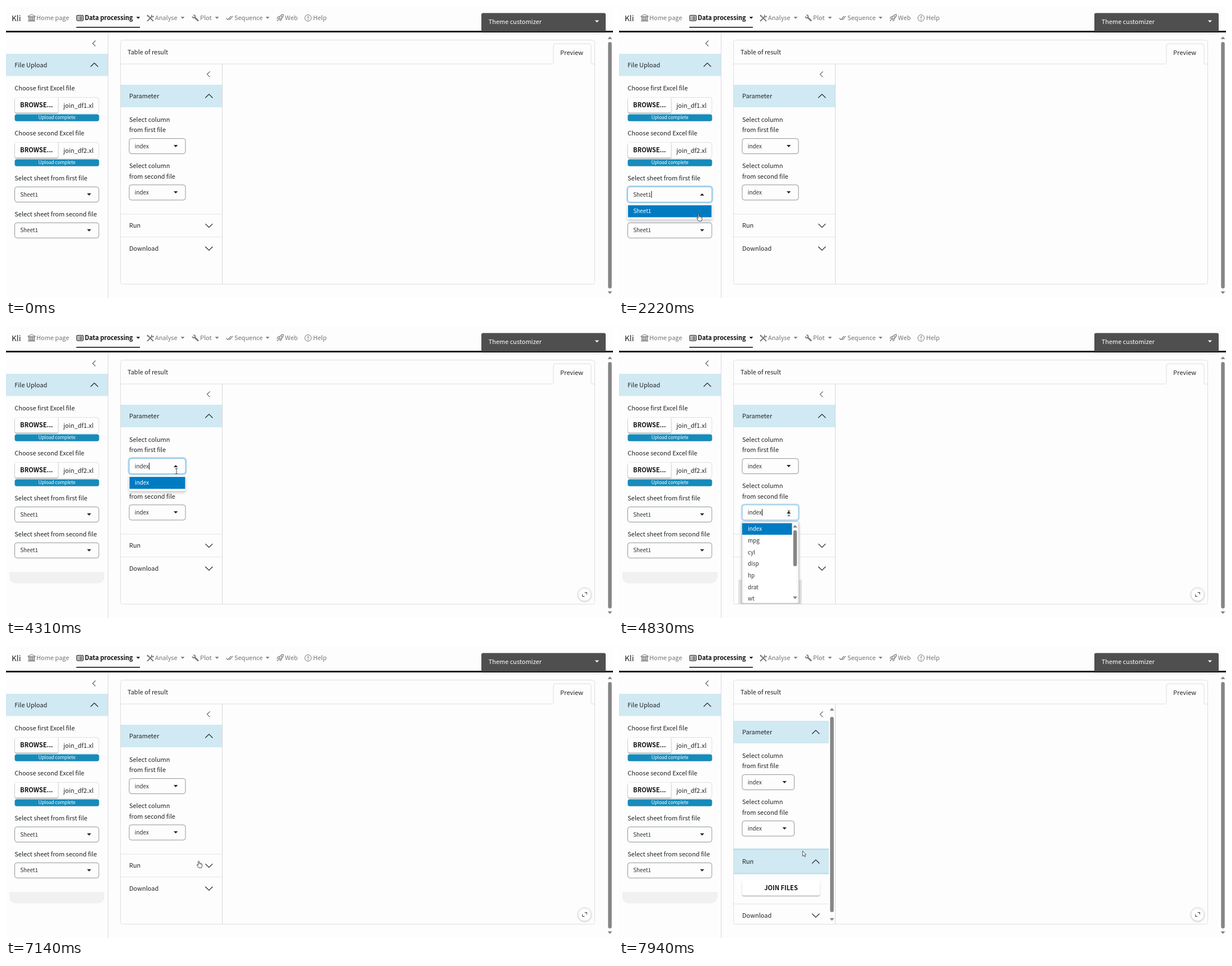
Write an HTML page with a canvas that moves like this. It is 1079 px wide and 519 px high and loops after 7990 ms.

```html
<!DOCTYPE html>
<html lang="en">
<head>
<meta charset="utf-8">
<title>File join</title>
<style>
html, body { margin: 0; width: 100%; height: 100%; overflow: hidden; background: #fdfdfd; }
canvas { display: block; width: 1079px; height: 519px; }
</style>
</head>
<body>
<canvas id="stage"></canvas>
<script>
const W = 1079, H = 519, LOOP = 7990;
const FONT = '"Noto Sans CJK SC", "Noto Sans CJK JP", "Noto Sans CJK", "Open Sans", sans-serif';
const INK = '#212325', GREY = '#757575', PAPER = '#fdfdfd', SKY = '#d0e9f2',
      LINE = '#dedede', BLUE = '#007bc2', TEAL = '#168bba';

const canvas = document.getElementById('stage');
const g = canvas.getContext('2d');
const dpr = window.devicePixelRatio || 1;
canvas.width = W * dpr;
canvas.height = H * dpr;

const clamp = (v, a = 0, b = 1) => Math.min(b, Math.max(a, v));
const smooth = v => { v = clamp(v); return v * v * (3 - 2 * v); };
const within = (t, a, b) => t >= a && t < b;

function text(s, x, y, o = {}) {
  const size = o.size || 10.97;
  g.font = `${o.weight || 400} ${size}px ${FONT}`;
  g.textAlign = o.align || 'left';
  g.fillStyle = o.color || INK;
  g.fillText(s, x, y + size * 0.37);
}

function rect(x, y, w, h, color) {
  g.fillStyle = color;
  g.fillRect(x, y, w, h);
}

function round(x, y, w, h, r, fill, stroke, lw = 1) {
  g.beginPath();
  g.roundRect(x, y, w, h, r);
  if (fill) { g.fillStyle = fill; g.fill(); }
  if (stroke) { g.strokeStyle = stroke; g.lineWidth = lw; g.stroke(); }
}

// Polyline given as a flat list of coordinates.
function poly(pts, color, lw = 1.2, fill) {
  g.beginPath();
  for (let i = 0; i < pts.length; i += 2) g.lineTo(pts[i], pts[i + 1]);
  if (fill) { g.closePath(); g.fillStyle = fill; g.fill(); }
  if (color) { g.strokeStyle = color; g.lineWidth = lw; g.stroke(); }
}

function ring(x, y, r, color, lw = 1, fill) {
  g.beginPath();
  g.arc(x, y, r, 0, Math.PI * 2);
  if (fill) { g.fillStyle = fill; g.fill(); }
  g.strokeStyle = color;
  g.lineWidth = lw;
  g.stroke();
}

// Small solid triangle; dir 1 points down, -1 up.
function wedge(x, y, dir = 1, color = INK, w = 3.7, h = 2) {
  poly([x - w, y - h * dir, x + w, y - h * dir, x, y + h * dir], null, 0, color);
}

// Wide chevron; dir 1 points down, -1 up.
const chevron = (x, y, dir) =>
  poly([x - 6.5, y - 3.2 * dir, x, y + 3.2 * dir, x + 6.5, y - 3.2 * dir], INK, 1.2);

const backArrow = (x, y) => poly([x + 2.5, y - 5, x - 2.5, y, x + 2.5, y + 5], '#666', 1.2);

function shaded(blur, dy, alpha, draw) {
  g.save();
  g.shadowColor = `rgba(0,0,0,${alpha})`;
  g.shadowBlur = blur * dpr;
  g.shadowOffsetY = dy * dpr;
  draw();
  g.restore();
}

/* ---------- navigation ---------- */

function icons() {
  // bank
  poly([39, 19, 39, 18, 45.5, 15, 52, 18, 52, 19], GREY, 1, PAPER);
  poly([39, 19.2, 52, 19.2], GREY, 1);
  for (let x = 41; x < 52; x += 3) rect(x - 0.7, 20, 1.6, 5, GREY);
  rect(40, 24.7, 11, 1, GREY);
  rect(39, 26.2, 13, 1.2, GREY);
  // list card
  round(125.7, 16.7, 11.6, 9.4, 1.5, null, INK, 1.2);
  for (let y = 19.2; y < 25; y += 2.2) {
    rect(127.5, y - 0.5, 1.6, 1.2, INK);
    rect(130.2, y - 0.5, 5.5, 1.2, INK);
  }
  // crossed tools
  poly([252, 17, 262, 27], GREY, 1.8);
  poly([251, 27, 260, 18], GREY, 1.8);
  poly([251, 18.2, 252.5, 16], GREY, 2);
  g.beginPath(); g.arc(260.5, 17.5, 2, 0, 4.3); g.lineWidth = 1.3; g.stroke();
  // wrench
  poly([335, 20, 342, 26.5], GREY, 2.6);
  g.beginPath(); g.arc(333.8, 18.6, 2.4, -1.8, 3.2); g.lineWidth = 1.8; g.stroke();
  // double tick
  poly([391.5, 21.5, 394.3, 24.3, 400, 17.8], GREY, 1.2);
  poly([396.5, 23.2, 397.6, 24.3, 403, 17.8], GREY, 1.2);
  // rocket
  poly([485, 22, 487, 18, 490, 15.6, 493.3, 15.2, 492.8, 18.5, 490.5, 21.3, 486.8, 23.5], GREY, 1.1, PAPER);
  poly([486.5, 18.5, 483.5, 18.8, 481.7, 21.7, 485, 21.8], GREY, 1);
  poly([490, 22, 489.5, 25, 487, 26.7, 486.8, 23.5], GREY, 1);
  poly([484.6, 23.4, 481.8, 26.8], GREY, 1.3);
  ring(489.9, 18.8, 1, GREY, 0.9);
  // notice
  ring(537, 21.3, 5.7, GREY, 1);
  rect(536.4, 18, 1.3, 4, GREY);
  rect(536.4, 23.1, 1.3, 1.4, GREY);
}

function navbar() {
  rect(0, 44, W, 3, '#19191b');
  text('Kli', 10, 22, { size: 13.7 });
  icons();
  const items = [['Home page', 54], ['Analyse', 265, 314], ['Plot', 345, 375],
                 ['Sequence', 406, 465], ['Web', 496], ['Help', 546]];
  for (const [label, x, mark] of items) {
    text(label, x, 21.3, { color: GREY });
    if (mark) wedge(mark, 21, 1, GREY, 3.4, 1.8);
  }
  text('Data processing', 140, 21.3, { weight: 700, color: '#111' });
  wedge(235, 21, 1, '#111', 3.4, 1.8);
  rect(125, 37, 113, 1.6, '#111');

  round(846, 44, 220, 6.5, [0, 0, 4, 4], 'rgba(0,0,0,.06)');
  round(845, 12.5, 221, 32.5, [3, 3, 0, 0], '#4f4f4f');
  text('Theme customizer', 857.7, 28.3, { color: '#fff' });
  wedge(1050.5, 27.3, 1, '#fff', 3.6, 1.9);
}

function scrollbar(x, top, from, to, bottom, w = 6.5) {
  wedge(x, top, -1, '#808080', 4, 2.2);
  round(x - w / 2, from, w, to - from, w / 2, '#868686');
  wedge(x, bottom, 1, '#808080', 4, 2.2);
}

/* ---------- controls ---------- */

function select(x, y, w, value, focus, blinkOn) {
  const h = 27, on = focus > 0;
  if (on) round(x - 1, y - 1, w + 2, h + 2, 5, null, `rgba(0,123,194,${0.28 * focus})`, 3);
  round(x, y, w, h, 4, PAPER, on ? '#82bce0' : '#8f959b');
  text(value, x + 9.7, y + 13.4, { size: 9.85, color: '#2e3236' });
  wedge(x + w - 17.3, y + 13.4, on ? -1 : 1);
  if (on && blinkOn) rect(x + 10 + g.measureText(value).width, y + 7.5, 1, 12, '#111');
}

function menu(x, y, w, value) {
  shaded(5, 3, 0.2, () => round(x - 0.5, y, w + 1, 28.5, 3, '#fff'));
  rect(x + 0.5, y + 3.4, w - 1, 21.3, BLUE);
  text(value, x + 10, y + 13.8, { size: 9.85, color: '#fff' });
}

function longMenu() {
  g.save();
  g.beginPath(); g.rect(204, 340, 180, 154); g.clip();
  rect(212, 451, 113, 43, '#e4e4e4');
  shaded(4, 2, 0.25, () => round(218.5, 347.5, 101, 145.5, 3, '#fff', '#ccc'));
  rect(219, 350.5, 88.5, 20.5, BLUE);
  ['index', 'mpg', 'cyl', 'disp', 'hp', 'drat', 'wt'].forEach((s, i) =>
    text(s, 229, 360.7 + i * 20.65, { size: 9.85, color: i ? '#2e3236' : '#fff' }));
  scrollbar(313, 356, 363, 427, 483);
  g.restore();
}

function button(x, y, w, h, label) {
  shaded(2, 1.5, 0.3, () => round(x, y, w, h, 3, '#fff'));
  text(label, x + w / 2, y + h / 2 - 0.2, { size: 11.1, weight: 700, align: 'center', color: '#111' });
}

function upload(y, label, file) {
  text(label, 15.3, y);
  round(15.5, y + 16.5, 149.5, 28.5, 4, PAPER, '#e0e0e0');
  button(16, y + 16.5, 76.5, 27, 'BROWSE...');
  rect(92.5, y + 16.5, 1, 28, '#dcdcdc');
  text(file, 102, y + 31);
  round(15.5, y + 46.4, 150, 12.4, 3.5, TEAL);
  text('Upload complete', 90.5, y + 52.3, { size: 8.25, color: '#fff', align: 'center' });
}

/* ---------- panels ---------- */

// Focus spans of the four drop-downs.
const OPEN = { sheet1: [1200, 2300], sheet2: [2640, 3430], col1: [3790, 4530], col2: [4780, 6160] };

const focusOf = (t, k) => within(t, ...OPEN[k]) ? clamp((t - OPEN[k][0] + 40) / 130) : 0;
const blink = (t, k) => (t - OPEN[k][0]) % 1010 < (k === 'col1' ? 600 : 505);
const menuOn = (t, k) => within(t, OPEN[k][0] + 40, OPEN[k][1]);

function leftPanel(t) {
  rect(181, 47, 1, H - 47, '#dadada');
  backArrow(156.5, 66.5);
  rect(0, 85, 181, 39.5, SKY);
  text('File Upload', 15.3, 104.7);
  chevron(157, 104.5, -1);
  upload(146, 'Choose first Excel file', 'join_df1.xl');
  upload(226, 'Choose second Excel file', 'join_df2.xl');
  text('Select sheet from first file', 15.3, 306.3);
  text('Select sheet from second file', 15.3, 370);
  if (t >= 2680) round(6, 437, 169, 20.5, [2, 2, 12, 12], '#f1f1f1');
  if (menuOn(t, 'sheet2')) round(10, 437, 161, 17, [2, 2, 10, 10], '#dedede');
  select(15.5, 321.5, 149.5, 'Sheet1', focusOf(t, 'sheet1'), blink(t, 'sheet1'));
  select(15.5, 385.3, 149.5, 'Sheet1', focusOf(t, 'sheet2'), blink(t, 'sheet2'));
  if (menuOn(t, 'sheet1')) menu(15.5, 350.8, 149.5, 'Sheet1');
  if (menuOn(t, 'sheet2')) menu(15.5, 414.6, 149.5, 'Sheet1');
}

function card() {
  round(203.5, 60.5, 843, 434, 4, PAPER, LINE);
  rect(204, 102.5, 842, 1, LINE);
  text('Table of result', 216, 81.8);
  round(973, 67, 67, 37, [4, 4, 0, 0], PAPER, LINE);
  rect(972.5, 102, 68, 3, PAPER);
  text('Preview', 985.3, 83);
  rect(384, 103, 1, 391, '#d6d6d6');
}

function innerPanel(t) {
  const run = t >= 7290;
  const e = run ? smooth((t - 7290) / 350) : 0;
  const grow = 55 * e;
  const bar = grow > 42;
  const up = clamp((grow - 42) * 0.7, 0, 7);
  const right = bar ? 373 : 384, chev = right - 23.2, w = bar ? 92.5 : 100;

  g.save();
  g.beginPath(); g.rect(204, 103, 180, 391); g.clip();
  backArrow(360, 121.3);
  g.translate(0, -up);

  rect(204, 140, right - 204, 40, SKY);
  text('Parameter', 219, 160);
  chevron(chev, 160, -1);
  ['first', 'second'].forEach((n, i) => {
    const y = 202 + i * 82.3, k = 'col' + (i + 1);
    text('Select column', 219, y);
    text(`from ${n} file`, 219, y + 18.4);
    select(219, y + 33.6, w, 'index', focusOf(t, k), blink(t, k));
  });

  rect(204, 369.5, right - 204, 1, '#e4e4e4');
  if (run) {
    rect(204, 367, right - 204, 45.5, '#b9dce9');
    rect(204, 369.5, right - 204, 41, SKY);
  }
  text('Run', 219, 390.3);
  chevron(chev, 390.3, 1 - 2 * e);
  if (grow > 0) {
    g.save();
    g.beginPath(); g.rect(204, 412.5, 180, Math.max(0, grow - 2)); g.clip();
    button(219, 423, right - 235, 27.5, 'JOIN FILES');
    g.restore();
  }
  rect(204, 410 + grow, right - 204, 1, '#e4e4e4');
  text('Download', 219, 431 + grow);
  chevron(chev, 431 + grow, 1);
  g.restore();

  if (bar) scrollbar(378.5, 112.5, 126, 473, 486);
  if (menuOn(t, 'col1')) menu(219, 264.8, 100, 'index');
  if (menuOn(t, 'col2')) longMenu();
}

function expandButton() {
  shaded(3, 1, 0.15, () => ring(1028.5, 477, 12, '#dcdcdc', 1, '#fff'));
  poly([1028.7, 473.6, 1032.4, 473.6, 1032.4, 477.2], '#555', 1.2);
  poly([1024.7, 477, 1024.7, 480.7, 1028.3, 480.7], '#555', 1.2);
}

/* ---------- pointer ---------- */

// time, x, y of the hot spot, and the shape used from then on
const PATH = [
  [300, 345, 8, 'arrow'], [620, 290, 180, 'arrow'], [900, 165, 325, 'arrow'],
  [980, 147, 336, 'beam'], [1060, 144, 335, 'beam'], [1930, 144, 335, 'beam'],
  [1955, 143, 362, 'hand'], [1980, 141.5, 370, 'hand'], [2300, 141.5, 370, 'hand'],
  [2500, 145, 399, 'beam'], [2700, 147, 400, 'beam'],
  [2800, 178, 398, 'arrow'], [2900, 300, 370, 'arrow'], [3060, 420, 290, 'arrow'],
  [3330, 348.5, 246, 'arrow'], [3430, 348.5, 246, 'arrow'],
  [3600, 312, 256, 'beam'], [3700, 303, 258, 'beam'], [4360, 303, 258, 'beam'],
  [4460, 302, 275, 'hand'], [4540, 302, 278, 'hand'],
  [4680, 301, 328, 'beam'], [4760, 302, 333, 'beam'], [5120, 302, 333, 'beam'],
  [5400, 325, 318, 'arrow'], [5790, 351, 297, 'arrow'], [6580, 351, 297, 'arrow'],
  [6860, 345, 376, 'arrow'], [7000, 345, 376, 'hand'], [7140, 342.5, 382, 'hand'],
  [7640, 342.5, 382, 'arrow'], [7920, 326, 364, 'arrow'], [LOOP, 326, 364, 'arrow']
];

function pointerAt(t) {
  const i = PATH.findIndex(p => p[0] > t);
  if (i < 1) return null;
  const [t0, x0, y0, shape] = PATH[i - 1], [t1, x1, y1] = PATH[i];
  const f = (t - t0) / (t1 - t0);
  return { x: x0 + (x1 - x0) * f, y: y0 + (y1 - y0) * f, shape };
}

const shapes = {
  arrow() {
    poly([0.4, 0.3, 0.4, 9.6, 2.5, 7.7, 4, 10.8, 5.4, 10.2, 4, 7.1, 6.7, 6.9, 0.4, 0.3], '#444', 0.9, '#fff');
  },
  beam() {
    poly([-2.3, -4.5, 2.3, -4.5], '#333', 0.9);
    poly([0, -4.5, 0, 4.5], '#333', 0.9);
    poly([-2.3, 4.5, 2.3, 4.5], '#333', 0.9);
  },
  hand() {
    poly([-0.8, 7, -0.8, 0.8, 0, 0, 0.9, 0.8, 0.9, 4.2, 2.6, 4, 4.4, 4.5, 5.9, 5.2,
          6, 9, 5, 12.2, 0, 12.2, -3.4, 7.4, -2.4, 6.3, -0.8, 7.6], '#333', 0.9, '#fff');
    poly([2.5, 4.4, 2.5, 6.6], '#555', 0.7);
    poly([4.2, 4.8, 4.2, 6.8], '#555', 0.7);
  }
};

function pointer(p) {
  g.save();
  g.translate(p.x, p.y);
  shapes[p.shape]();
  g.restore();
}

/* ---------- frame ---------- */

function draw(t) {
  g.setTransform(dpr, 0, 0, dpr, 0, 0);
  rect(0, 0, W, H, PAPER);
  navbar();
  leftPanel(t);
  card();
  innerPanel(t);
  const p = pointerAt(t);
  if (p && p.x > 204 && within(p.y, 60, 495)) expandButton();
  scrollbar(1073.5, 56.5, 64, 502, 509.5);
  if (p) pointer(p);
}

const start = performance.now();
function tick() {
  draw((performance.now() - start) % LOOP);
  requestAnimationFrame(tick);
}
tick();
</script>
</body>
</html>
```
